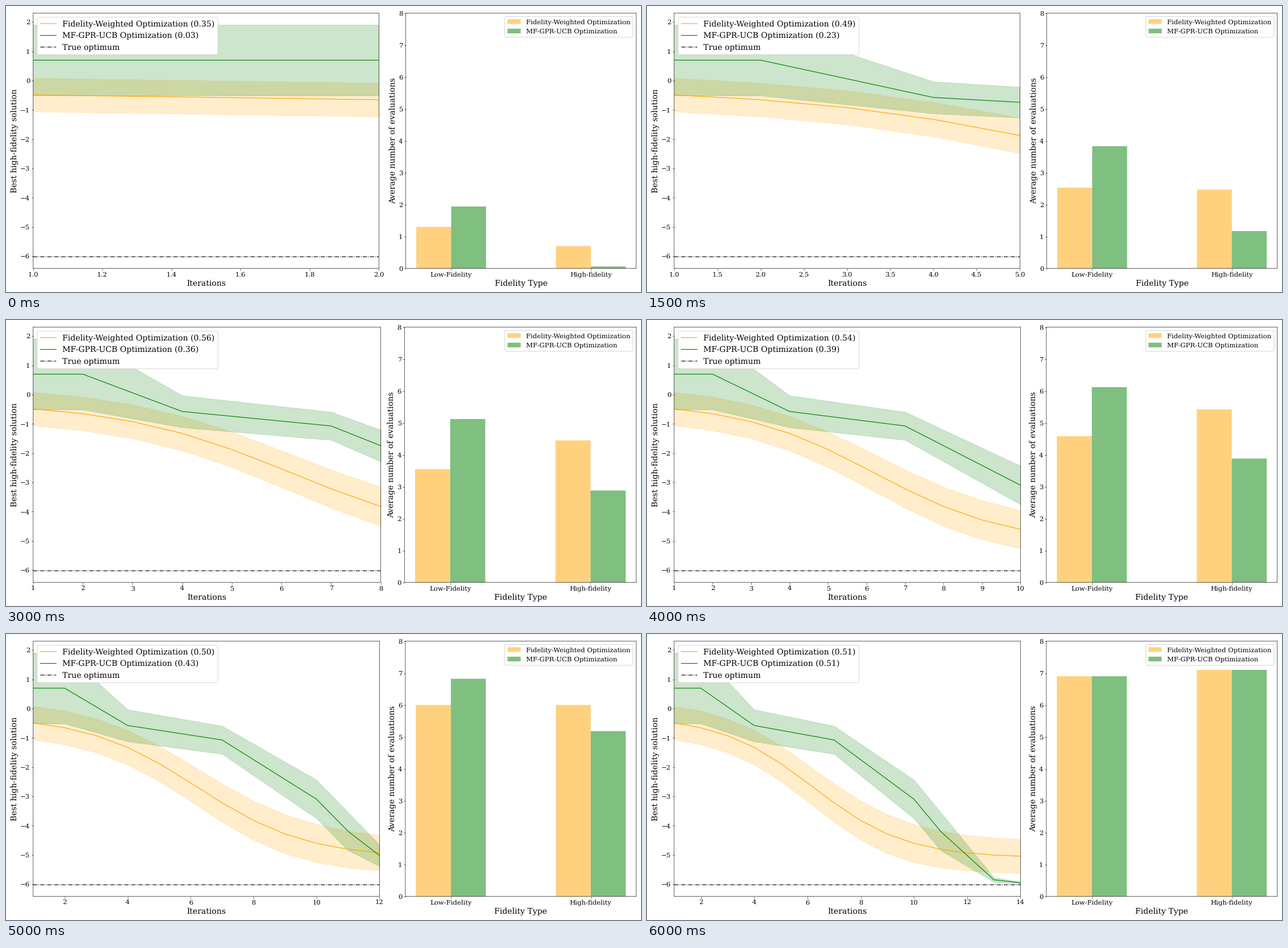
These frames come from a looping animation (1116x502 px, 8500 ms). A matplotlib script:

```python
import matplotlib.pyplot as plt
import numpy as np
from matplotlib.animation import FuncAnimation

plt.rcParams.update({
    "font.family": "DejaVu Serif",
    "axes.labelsize": 18,
    "xtick.labelsize": 15,
    "ytick.labelsize": 15,
    "legend.framealpha": 1,
    "text.hinting": "none",
    "path.snap": False,
})

FIRST, LAST = 2, 14
FRAMES, INTERVAL = 17, 500
OPTIMUM = -6.0207
BAR = 0.25
STEPS = [2, 5, 8, 10, 12, 14]


def weighted(x):
    """Smooth S-shaped descent; the band swells slightly halfway."""
    mean = -0.25 - 4.85 / (1 + np.exp((6.2 - x) / 1.75))
    half = 0.57 + 0.1 * np.exp(-((x - 8.5) / 3.4) ** 2)
    return mean, half


def bound_based(x):
    """Descent in stages; the band closes as the optimum is reached."""
    turns = [2, 4, 7, 10, 11, 13, 14]
    mean = np.interp(x, turns, [0.70, -0.575, -1.07, -3.095, -4.19, -5.85, -5.95])
    half = np.interp(x, turns, [1.21, 0.545, 0.48, 0.66, 0.65, 0.08, 0.035])
    return mean, half


# (label, colour, curve, mean high-fidelity evaluations at STEPS)
METHODS = [
    ("Fidelity-Weighted Optimization", "orange", weighted,
     [0.70, 2.47, 4.45, 5.42, 6.0, 7.1]),
    ("MF-GPR-UCB Optimization", "green", bound_based,
     [0.06, 1.17, 2.88, 3.88, 5.18, 7.1]),
]

fig, (curves, bars) = plt.subplots(
    1, 2, figsize=(20, 8.9965), dpi=55.8,
    gridspec_kw={"width_ratios": [3, 2]},
)


def draw_method(i, step):
    name, color, curve, counts = METHODS[i]
    high = np.interp(step, STEPS, counts)

    x = np.arange(1, step + 1)
    mean, half = curve(x)
    curves.plot(x, mean, color=color, label=f"{name} ({high / step:.2f})")
    curves.fill_between(x, mean - half, mean + half, color=color, alpha=0.2)

    bars.bar(np.arange(2) + (i - 0.5) * BAR, [step - high, high], BAR,
             color=color, alpha=0.5, label=name)


def update(frame):
    step = min(FIRST + frame, LAST)
    curves.clear()
    bars.clear()
    for i in range(len(METHODS)):
        draw_method(i, step)

    curves.plot([1, step], [OPTIMUM] * 2, "-.", color="black", label="True optimum")
    curves.set(xlim=(1, step), ylim=(-6.417, 2.307),
               xlabel="Iterations", ylabel="Best high-fidelity solution")
    curves.legend(loc="upper left", fontsize=18)

    bars.set_xticks([0, 1], ["Low-Fidelity", "High-fidelity"])
    bars.set(ylim=(0, 8), xlabel="Fidelity Type",
             ylabel="Average number of evaluations")
    bars.legend(loc="upper right", fontsize=15)
    fig.tight_layout()
    return []


anim = FuncAnimation(fig, update, frames=FRAMES, interval=INTERVAL,
                     init_func=lambda: update(0), repeat=True)
plt.show()
```
